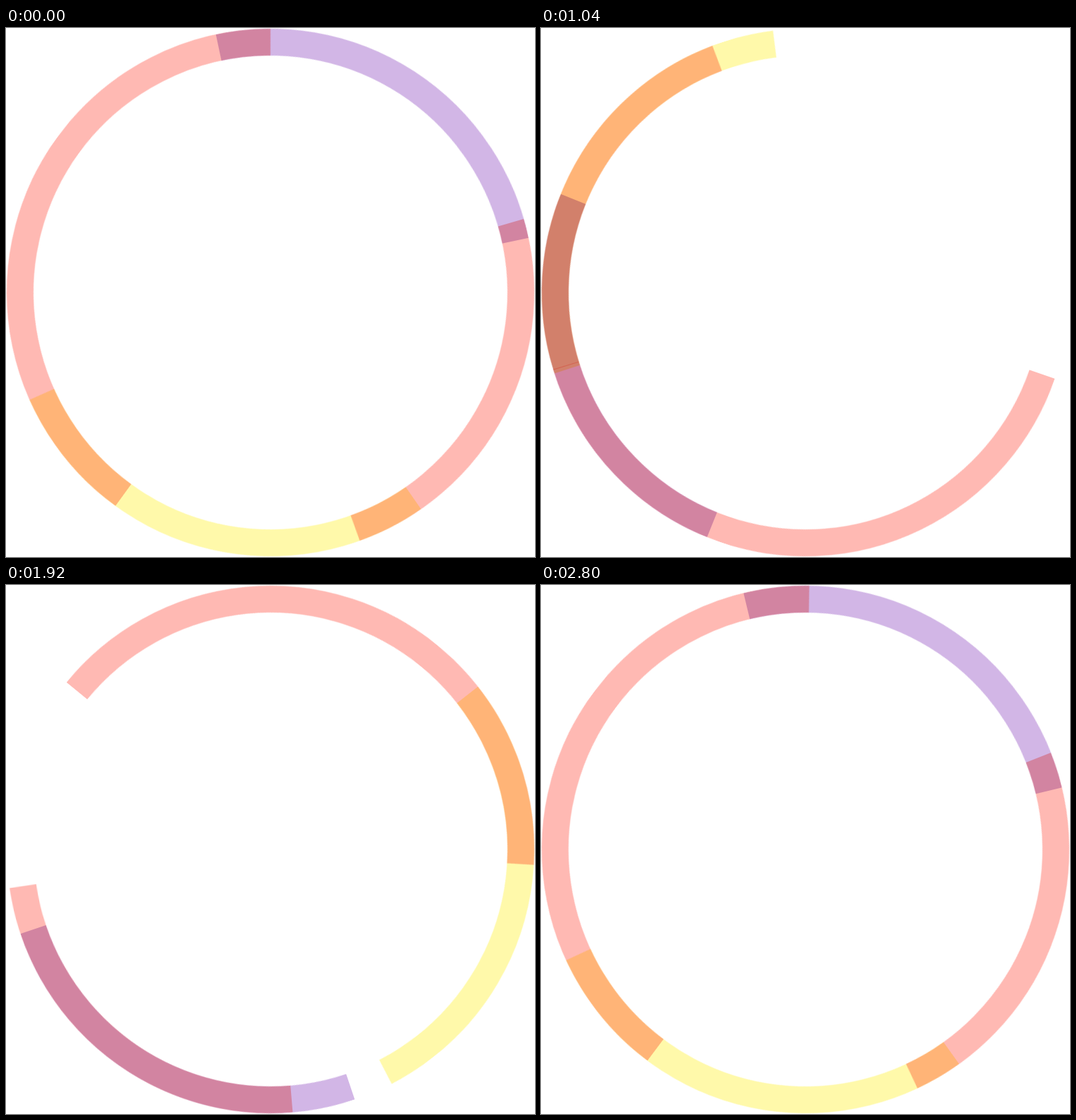
An HTML page for the animation above (2880 ms loop, 748 px wide and 748 px high).

```html
<!DOCTYPE html>
<html lang="en">
<head>
<meta charset="utf-8">
<title>Ring loader</title>
<style>
  html, body { margin: 0; width: 100%; height: 100%; overflow: hidden; background: #fff; }
  svg { display: block; width: 748px; height: 748px; background: #fff; isolation: isolate; }
  circle { fill: none; stroke-width: 38; mix-blend-mode: multiply; transform-origin: 374px 374px; }
</style>
</head>
<body>
<svg id="ring" viewBox="0 0 748 748"></svg>
<script>
  const LOOP = 2880, STEP = 80;
  const SOFT = 'cubic-bezier(0.3333, 0, 0.6667, 1)';
  const LATE = 'cubic-bezier(0.3333, 0, 0.8333, 1)';

  // Angles in degrees, clockwise from the top; overlaps multiply.
  const arcs = [
    { color: '#fff9aa', start: 145.2, sweep: 100.8, turns: 1, easing: SOFT },
    { color: '#ffb9b3', start: 216, sweep: 144, turns: -1, easing: SOFT },
    { color: '#ffb9b3', start: 73.8, sweep: 86.4, turns: 2, easing: LATE },
    { color: '#d2b6e6', start: 348.05, sweep: 90, turns: 2, easing: SOFT }
  ];

  const ring = document.getElementById('ring');

  function addArc({ color, start, sweep, turns, easing }) {
    const arc = document.createElementNS('http://www.w3.org/2000/svg', 'circle');
    const attrs = {
      cx: 374, cy: 374, r: 354, stroke: color,
      pathLength: 360, 'stroke-dasharray': `${sweep} ${360 - sweep}`
    };
    for (const name in attrs) arc.setAttribute(name, attrs[name]);
    ring.append(arc);

    const from = start - 90;
    arc.animate([
      { transform: `rotate(${from}deg)`, easing },
      { transform: `rotate(${from + 360 * turns}deg)` }
    ], { duration: LOOP, iterations: Infinity, easing: `steps(${LOOP / STEP})` });
  }

  arcs.forEach(addArc);
</script>
</body>
</html>
```
